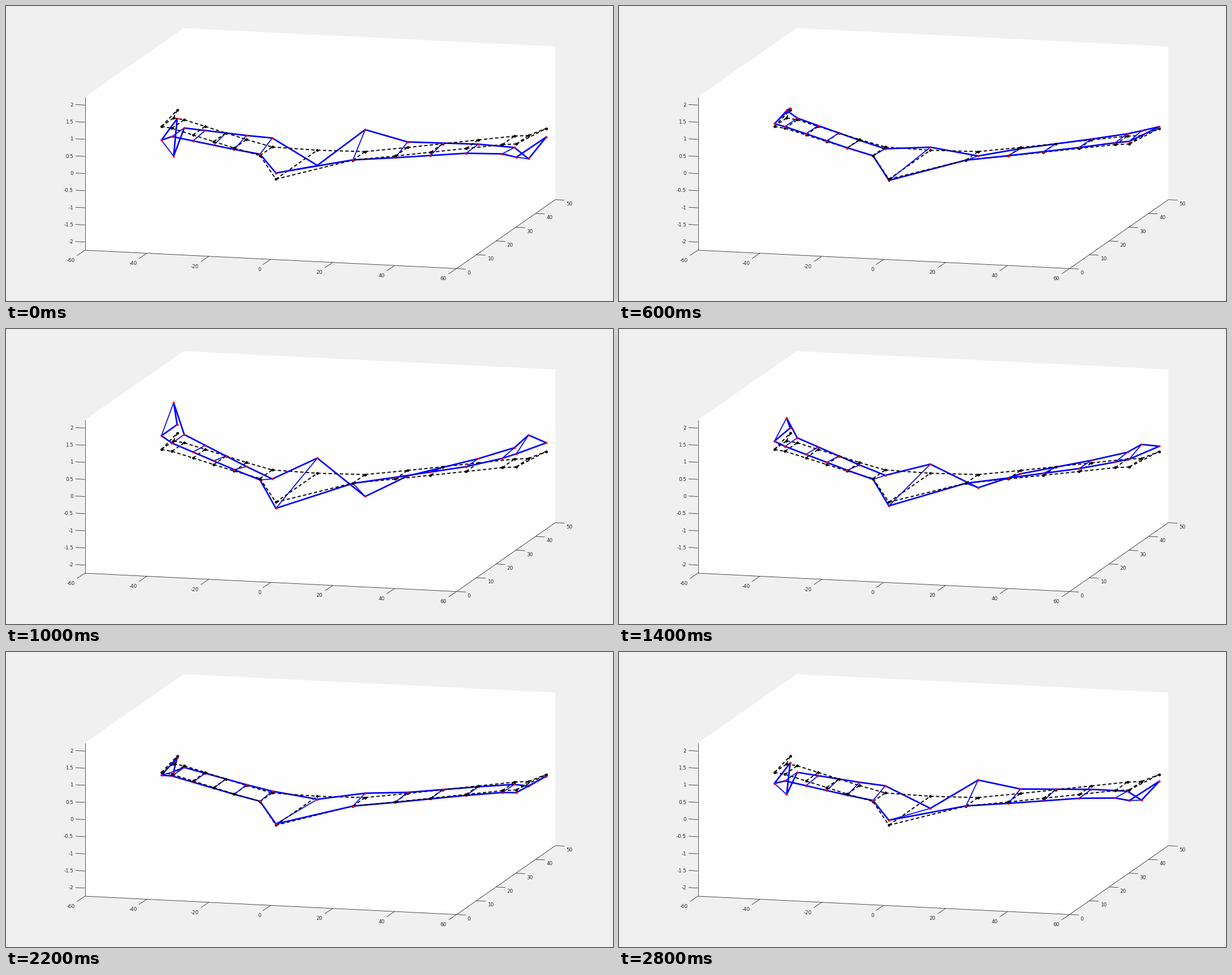
Recreate the animation shown at these times as a matplotlib script. Size 1073x522 px, loop 3 s.

```python
import numpy as np
import matplotlib.pyplot as plt
from matplotlib.animation import FuncAnimation

W, H, DPI = 1073, 522, 64
PX = 72 / DPI  # points per pixel
FRAMES, INTERVAL, RISE = 15, 200, 5
INK = "#262626"
ZMAX = 2.237

fig = plt.figure(figsize=(W / DPI, H / DPI), dpi=DPI, facecolor="#f0f0f0")
ax = fig.add_axes([0, 0, 1, 1])
ax.set_xlim(0, W)
ax.set_ylim(H, 0)
ax.axis("off")


def project(x, y, z):
    """Parallel projection from axis units to pixels."""
    return (139.5 + 5.475 * (x + 60) + 3.49 * y,
            296.5 + 0.2708 * (x + 60) - 2.437 * y - 60.6 * z)


def draw_axis(ends, ticks, tick, label, align):
    """Axis line through `ends` with a tick and a number at each (x, y, z, value)."""
    style = dict(color=INK, lw=0.8 * PX, zorder=1, solid_capstyle="butt")
    ax.plot(*zip(*(project(*e) for e in ends)), **style)
    for *point, value in ticks:
        x, y = project(*point)
        ax.plot([x, x + tick[0]], [y, y + tick[1]], **style)
        ax.text(x + label[0], y + label[1], f"{value:g}", ha=align,
                va="center_baseline", color=INK, family="DejaVu Sans",
                size=8.8 * PX)


def draw_box():
    left, front, right = (-60, 0, -ZMAX), (60, 0, -ZMAX), (60, 50, -ZMAX)
    top = [(60, 50, ZMAX), (-60, 50, ZMAX), (-60, 0, ZMAX)]
    corners = [project(*c) for c in (left, front, right, *top)]
    ax.add_patch(plt.Polygon(corners, fc="#fefefe", ec="none", zorder=0))
    draw_axis((left, top[-1]), [(-60, 0, v, v) for v in np.arange(-2, 2.1, 0.5)],
              (-16.5, -0.9), (-20.5, -0.9), "right")
    draw_axis((left, front), [(v, 0, -ZMAX, v) for v in range(-60, 61, 20)],
              (-14, 9.4), (-17.5, 17.2), "right")
    draw_axis((front, right), [(60, v, -ZMAX, v) for v in range(0, 51, 10)],
              (16.3, 0.8), (19.2, 6.8), "left")


def make_wing():
    """Swept wing: front and rear nodes as (x, y, swing), plus both tips."""
    half = np.array([15, 26, 35, 44.1, 53.3, 57.3])
    x = np.concatenate([-half[::-1], [0], half])
    y = np.interp(abs(x), [0, 15, 26, 53.3, 57.3], [2.6, 18.1, 22.3, 33.6, 34.5])
    chord = np.where(x == 0, 21, 6.2)
    # mode shape, linear between these stations
    keys = [-57.3, -53.3, -15, 0, 15, 26, 44.1, 53.3, 57.3]
    nose = [0.4, 0.24, -0.04, -0.18, -0.007, 0.05, 0.14, 0.27, 0.385]
    tail = [1.117, 0.24, -0.262, 0.442, -0.64, -0.162, 0.125, 0.333, 0.683]
    front = np.column_stack([x, y, np.interp(x, keys, nose)])
    rear = np.column_stack([x, y + chord, np.interp(x, keys, tail)])
    return front, rear, np.array([(-59.6, 46.1, 0.25), (59.6, 46.1, 0.25)])


def pairs(nodes):
    return list(zip(nodes[:-1], nodes[1:]))


def make_moving():
    """Draw the resting wing; return its moving twin as (artist, nodes, layer)."""
    front, rear, tips = make_wing()
    outer = [front[0], tips[0], *rear, tips[1]]
    inner = [*front, tips[1]]
    edges = [(e, 2.7, 2) for e in pairs(outer)]
    edges += [(e, 1.7, 3) for e in zip(front, rear)]
    edges += [(e, 2.7, 5) for e in pairs(inner)]
    moving = []

    def add(nodes, layer, rest, live):
        x, y, swing = np.array(nodes).T
        px, py = project(x, y, 0)
        ax.plot(px, py, color="black", zorder=layer, **rest)
        artist, = ax.plot(px, py, **live)
        moving.append((artist, (x, y, swing), layer))

    dashed = dict(lw=1.9 * PX, ls=(0, (3.1, 2.1)), dash_capstyle="butt")
    for nodes, width, layer in edges:
        add(nodes, layer, dashed,
            dict(color="blue", lw=width * PX, solid_capstyle="round"))
    dot = dict(marker="o", ls="none", mew=0)
    for chain, layer in ((outer[1:-1], 4), (inner, 6)):
        for node in chain:
            add([node], layer, dict(ms=4.9 * PX, **dot),
                dict(color="red", ms=3.9 * PX, **dot))
    return moving


def phase(i):
    """Fast linear rise from -1 to 1, then a fall at half the speed."""
    if i <= RISE:
        return -1 + 2 * i / RISE
    return 1 - 2 * (i - RISE) / (FRAMES - RISE)


def update(i):
    s = phase(i)
    for artist, (x, y, swing), layer in moving:
        z = swing * s
        artist.set_data(*project(x, y, z))
        # seen from above, the higher of two parts lies in front
        artist.set_zorder(layer + 0.2 * np.sign(z.mean()))
    return [artist for artist, _, _ in moving]


draw_box()
moving = make_moving()
anim = FuncAnimation(fig, update, frames=FRAMES, interval=INTERVAL,
                     repeat=True, repeat_delay=0, blit=False)
plt.show()
```
